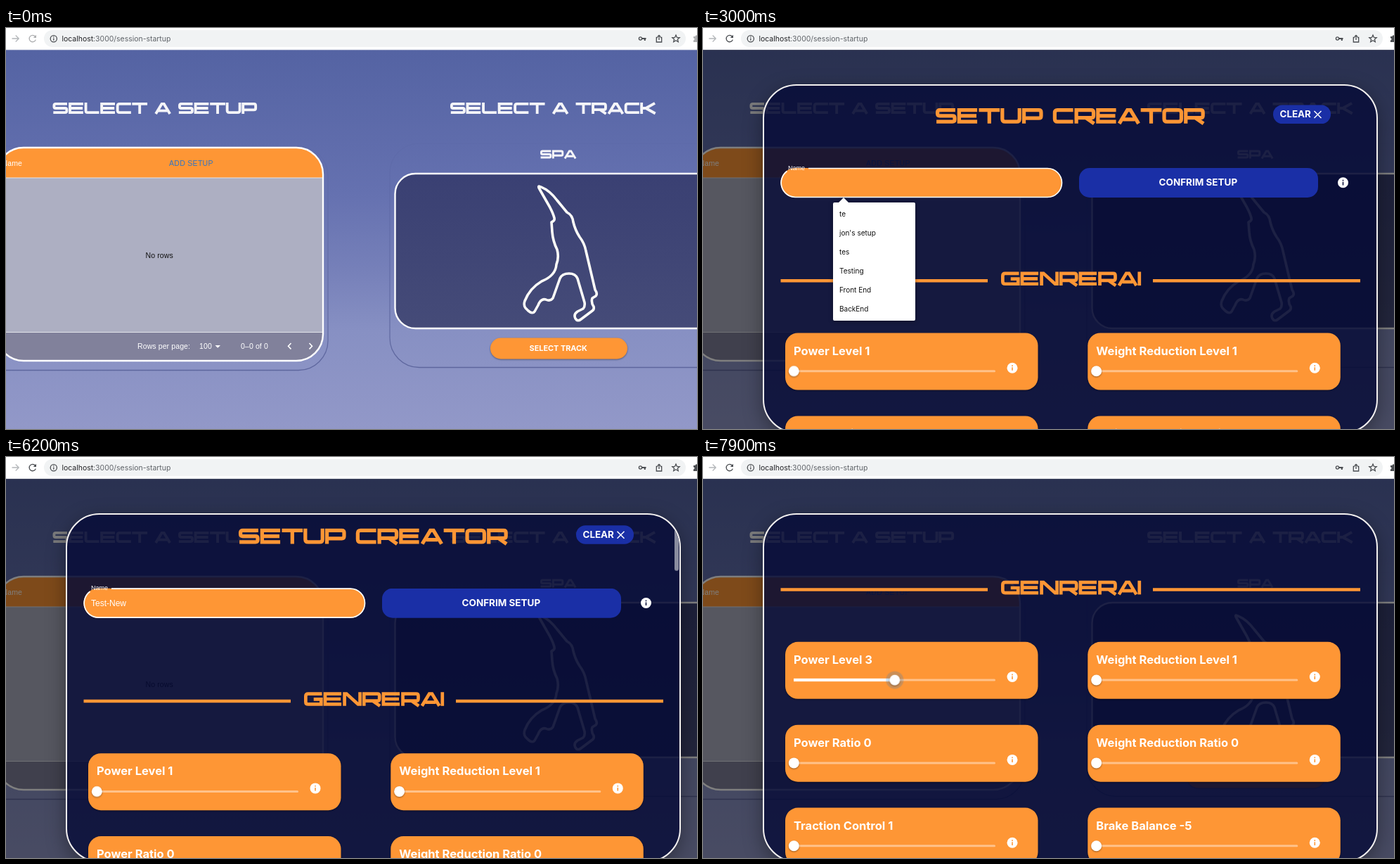
An HTML page for the animation above (8 s loop, 983x570 px).

```html
<!DOCTYPE html>
<html lang="en">
<head>
<meta charset="utf-8">
<title>Session startup</title>
<style>
html, body { margin: 0; width: 100%; height: 100%; overflow: hidden; background: #fff; }
#stage { position: absolute; left: 0; top: 0; width: 983px; height: 570px; overflow: hidden; }
svg { position: absolute; left: 0; top: 0; }
text { font-family: "Liberation Sans", Arial, sans-serif; white-space: pre; }
.ui { font-size: 10.5px; letter-spacing: .11px; fill: #fff; }
.sys { font: 10.45px Inter, sans-serif; }
.bold { font: 700 16.5px Inter, sans-serif; fill: #fff; }
.word path { fill: none; stroke: currentColor; stroke-width: 2.4; }
.line { fill: none; stroke: #4a4d51; stroke-width: 1.3; }
.card { fill: #fe9635; filter: drop-shadow(0 1px 1px #0006); }
.knob { fill: #fff; filter: drop-shadow(0 1px 1px #0006); }

#shade { position: absolute; top: 31px; width: 983px; height: 539px; background: #000; opacity: 0; }
#frame {
  position: absolute; box-sizing: border-box; left: 85px; top: 80px; width: 875px; height: 496px;
  border: 2px solid #f4f1f0; border-radius: 48px; background: rgba(5, 10, 55, .8);
  box-shadow: 0 8px 28px rgba(0, 0, 0, .36);
}

#shade, .wake, #hover, #ripple, #label, #scroll, #bar, #barMove, #thumb, #fill, #halo {
  animation: 8s linear infinite;
}
.wake { animation-name: wake; animation-timing-function: step-end; }
#hover { animation-name: hover; }
#ripple { animation-name: ripple; }
#shade { animation-name: shade; }
#label { animation-name: float; }
#scroll { animation-name: scroll; }
#bar { animation-name: bar; }
#barMove { animation-name: barMove; }
#thumb { animation-name: thumb; }
#fill { animation-name: fill; transform-origin: 129px 0; }
#halo { animation-name: halo; }

@keyframes wake { from { opacity: .45 } 13.75%, to { opacity: 1 } }
@keyframes hover { 0%, 17.2% { opacity: 0 } 19.5%, 25% { opacity: 1 } 27%, to { opacity: 0 } }
@keyframes ripple {
  0%, 20.6% { r: 0; opacity: 1 }
  22.5% { r: 38px; opacity: 1 }
  24% { r: 66px; opacity: 1 }
  26.25%, to { r: 70px; opacity: 0 }
}
@keyframes shade {
  0%, 23.74% { opacity: 0 }
  23.75% { opacity: .26; animation-timing-function: ease-out }
  26%, to { opacity: .5 }
}
@keyframes float {
  0%, 31% { transform: translate(121px, 223.6px); animation-timing-function: ease-out }
  33.5%, to { transform: translate(121px, 201.6px) scale(.75) }
}
@keyframes scroll {
  0%, 77% { transform: none; animation-timing-function: cubic-bezier(.4, .1, .75, .85) }
  80% { transform: translateY(-152px); animation-timing-function: cubic-bezier(.1, .6, .3, 1) }
  83.75%, to { transform: translateY(-170.7px) }
}
@keyframes barMove {
  0%, 77% { transform: none }
  80% { transform: translateY(22px); animation-timing-function: ease-out }
  83.75%, to { transform: translateY(25px) }
}
@keyframes bar { 0%, 77.4% { opacity: 0 } 77.5%, 87.2% { opacity: 1 } 91%, to { opacity: 0 } }
@keyframes thumb {
  0%, 94.8% { transform: none }
  96%, 97% { transform: translateX(72px); animation-timing-function: ease-out }
  98.7%, to { transform: translateX(143.5px) }
}
@keyframes fill {
  0%, 94.8% { transform: scaleX(0) }
  96%, 97% { transform: scaleX(.25); animation-timing-function: ease-out }
  98.7%, to { transform: scaleX(.5) }
}
@keyframes halo {
  0%, 88.5% { r: 0 }
  90.5% { r: 13px }
  92.5%, 95% { r: 17px }
  98%, to { r: 12.5px }
}
</style>
</head>
<body>
<div id="stage">
<svg width="983" height="570">
  <defs>
    <linearGradient id="sky" x2="0" y2="1">
      <stop stop-color="#5463a3"/><stop offset=".38" stop-color="#6571b0"/>
      <stop offset=".58" stop-color="#7680b9"/><stop offset=".74" stop-color="#8790c3"/>
      <stop offset="1" stop-color="#9298c8"/>
    </linearGradient>
    <linearGradient id="rim" x2="0" y2="1">
      <stop stop-color="#46508c" stop-opacity=".06"/><stop offset="1" stop-color="#3f4884" stop-opacity=".6"/>
    </linearGradient>
    <linearGradient id="asphalt" x2="0" y2="1">
      <stop stop-color="#3a4073"/><stop offset="1" stop-color="#454b78"/>
    </linearGradient>
    <clipPath id="table"><rect x="-13" y="170" width="464" height="303" rx="38"/></clipPath>
    <clipPath id="button"><rect x="226" y="178.500" width="75" height="27" rx="3"/></clipPath>
  </defs>

  <rect y="31" width="983" height="539" fill="url(#sky)"/>

  <!-- browser bar -->
  <rect width="983" height="31" fill="#fff"/>
  <rect y="30.500" width="983" height=".8" fill="#dcdfe6"/>
  <rect x="54" y="3" width="913" height="24" rx="12" fill="#f1f3f4"/>
  <path class="line" style="stroke:#b4b7ba" d="M8.500 15H18M13.700 10.500L18.200 15L13.700 19.500"/>
  <g class="wake">
    <path class="line" d="M41.600 12.200A4.700 4.700 0 1 0 42.300 16.600"/>
    <path fill="#4a4d51" d="M43 9.800V14H38.800Z"/>
    <path fill="#4a4d51" d="M978 12h2.500a1.700 1.700 0 0 1 3.400 0v8h-6v-2.600a1.600 1.600 0 0 0 0-3.200Z"/>
  </g>
  <circle class="line" cx="67.800" cy="15.200" r="4.600" stroke-width="1.100"/>
  <path class="line" d="M67.800 14.500V17.800M67.800 12.300V13.500"/>
  <text class="sys" x="79.500" y="19" fill="#5f6368"><tspan fill="#202124">localhost</tspan>:3000/session-startup</text>
  <circle class="line" cx="902.500" cy="15" r="2.100" stroke-width="2"/>
  <path class="line" style="stroke-width:2" d="M905 15H910.500M908.800 15V18"/>
  <path class="line" d="M927 13.500H925.300V20H932.700V13.500H931M929 17V10.500M926.800 12.500L929 10.300L931.200 12.500"/>
  <path class="line" d="M953 10l1.500 3.400 3.700.3-2.800 2.400.9 3.600-3.300-1.900-3.300 1.900.9-3.600-2.800-2.400 3.700-.3Z"/>

  <!-- setup table -->
  <g class="word" data-word="SELECT A SETUP" data-at="66.500 106 1.600" color="#f5f5f8"></g>
  <rect x="-60" y="168" width="518" height="318.500" rx="42" fill="none" stroke="url(#rim)" stroke-width="1.300"/>
  <g clip-path="url(#table)">
    <rect x="-13" y="170" width="466" height="43" fill="#fe9635"/>
    <rect x="-13" y="213" width="466" height="220" fill="#adafc2"/>
    <rect x="-13" y="433" width="466" height="41" fill="#81819b"/>
    <path d="M-13 213H452M-13 432.500H452" stroke="#e2e3ea"/>
    <text class="ui" x="-5.500" y="195.600">Name</text>
    <g id="hover">
      <path d="M219.500 171V212" stroke="#9b6a44"/>
      <path d="M218.500 186.500V197M449.500 186.500V197" stroke="#fff" stroke-width="1.500"/>
      <g fill="#fff"><circle cx="438.500" cy="187.800" r="1.400"/><circle cx="438.500" cy="192" r="1.400"/><circle cx="438.500" cy="196.200" r="1.400"/></g>
      <g clip-path="url(#button)">
        <rect x="226" y="178" width="75" height="28" fill="#1976d2" opacity=".05"/>
        <circle id="ripple" cx="241" cy="192" r="0" fill="#1976d2" fill-opacity=".28"/>
      </g>
    </g>
    <text x="232" y="195.600" font-size="10.500" letter-spacing=".3" fill="#2f74c6">ADD SETUP</text>
    <text class="ui" x="198.500" y="326.500" style="fill:#111">No rows</text>
    <text class="ui" x="187" y="456.300">Rows per page:</text>
    <text class="ui" x="275" y="456.300">100</text>
    <path d="M297.500 451H305L301.200 454.800Z" fill="#fff"/>
    <text class="ui" x="334" y="456.300">0–0 of 0</text>
    <path d="M405.500 448L401.500 452.200L405.500 456.400M431.500 448L435.500 452.200L431.500 456.400" fill="none" stroke="#fff" stroke-width="1.600"/>
  </g>
  <rect x="-13" y="170" width="464" height="303" rx="38" fill="none" stroke="#fff" stroke-width="2.400"/>

  <!-- track -->
  <g class="word" data-word="SELECT A TRACK" data-at="632 106 1.600" color="#f5f5f8"></g>
  <rect x="546" y="164" width="500" height="318.500" rx="42" fill="none" stroke="url(#rim)" stroke-width="1.300"/>
  <g class="word" data-word="SPA" data-at="760 173.500 1.200" color="#f5f5f8"></g>
  <rect x="553.500" y="207" width="480" height="220" rx="29" fill="url(#asphalt)" stroke="#fff" stroke-width="2.400"/>
  <path fill="none" stroke="#fffef8" stroke-width="3.600" stroke-linejoin="round" d="M758 225Q772 229 784 245L798 262Q806 266 807 276Q810 288 816 297Q823 306 825 317L838 372Q842 378 839 381L834 384Q832 390 836 396Q837 400 834 402L818 414Q813 418 810 413Q807 407 813 403L821 399Q824 396 823 390L813 356Q810 349 801 349Q791 349 788 356L778 384Q774 389 768 386Q761 384 757 394L752 403Q749 407 743 402L739 398Q736 394 738 388Q745 370 762 360Q782 352 783 336Q787 326 784 315Q778 303 777 290L776 276Q781 274 780 270Q778 262 771 250L759 229Q757 226 758 225Z"/>
  <rect class="card" x="689" y="440.500" width="195" height="30" rx="15"/>
  <text class="bold" x="744.500" y="459.300" style="font-size:10.9px">SELECT TRACK</text>
</svg>

<div id="shade"></div>

<div data-on="1900">
<div id="frame"></div>
<svg width="983" height="570">
  <defs><clipPath id="inside"><rect x="87" y="82" width="871" height="492" rx="46"/></clipPath></defs>
  <g clip-path="url(#inside)">
    <g id="scroll">
      <g class="word" data-word="SETUP CREATOR" data-at="331 114 2.180" color="#fe9635"></g>
      <rect x="811" y="109.500" width="82" height="26.500" rx="13.200" fill="#1a2fa6"/>
      <text class="bold" x="820.500" y="127.400" style="font-size:13.4px">CLEAR</text>
      <path d="M869.500 118L879.500 128M879.500 118L869.500 128" stroke="#fff" stroke-width="1.500"/>

      <rect x="110.500" y="199" width="400" height="42" rx="20.500" fill="#fe9635"/>
      <rect data-off="2500" x="111" y="199.500" width="399" height="41" rx="20.500" fill="none" stroke="#fff" stroke-width="1.200"/>
      <path data-on="2500" d="M150 199.500H490A20.500 20.500 0 0 1 490 240.500H131.500A20.500 20.500 0 0 1 119.500 203.500" fill="none" stroke="#fff" stroke-width="1.700"/>
      <g id="label"><text font-size="12" fill="#fff">Name</text></g>
      <text id="typed" x="121" y="223.800" font-size="12" fill="#fff"></text>
      <path id="caret" d="M.5 213V228" stroke="#fff"/>

      <rect x="535" y="199" width="340" height="42" rx="15" fill="#1a2fa6"/>
      <text class="bold" x="648.500" y="224.400" style="font-size:13.5px">CONFRIM SETUP</text>
      <g data-info="910.500 219.800 #0d123c"></g>

      <path d="M110.500 359.300H405M640 359.300H935" stroke="#fe9635" stroke-width="4.500"/>
      <g class="word" data-word="GENRERAI" data-at="424 346.500 1.960" color="#fe9635"></g>
      <g id="cards"></g>
    </g>
    <g id="bar"><rect id="barMove" x="951" y="85" width="6" height="73" rx="3" fill="#a0a2b0" opacity=".85"/></g>
  </g>
  <g data-on="2600" data-off="5100">
    <path d="M187 248H193L200 241L207 248H300a2 2 0 0 1 2 2V414a2 2 0 0 1-2 2H187a2 2 0 0 1-2-2V250a2 2 0 0 1 2-2Z" fill="#fff" style="filter:drop-shadow(0 1px 3px #0006)"/>
    <g id="list"></g>
  </g>
</svg>
</div>
</div>

<script>
const LOOP = 8000;
const $ = id => document.getElementById(id);

// Wide display lettering on a grid ten units high
const GLYPHS = {
  S: 'M12.800 1.200H2.600Q1.200 1.200 1.200 2.500V3.700Q1.200 5 2.600 5H11Q12.400 5 12.400 6.300V7.500Q12.400 8.800 11 8.800H.5',
  E: 'M13 1.200H1.200V8.800H13M1.200 5H12.500',
  L: 'M1.200 0V7.300Q1.200 8.800 2.700 8.800H13',
  C: 'M13.200 1.200H3Q1.200 1.200 1.200 3V7Q1.200 8.800 3 8.800H13.200',
  T: 'M0 1.200H13.600M6.800 1.200V10',
  A: 'M1 10L6.300 1.200H8.300L13.600 10M3.500 7.300H11',
  U: 'M1.200 0V7Q1.200 8.800 3 8.800H10.600Q12.400 8.800 12.400 7V0',
  P: 'M1.200 10V1.200H10.900Q12.400 1.200 12.400 2.700V5Q12.400 6.500 10.900 6.500H1.200',
  R: 'M1.200 10V1.200H10.900Q12.400 1.200 12.400 2.700V4.800Q12.400 6.300 10.900 6.300H1.200M7.500 6.300L12.800 10',
  K: 'M1.200 0V10M1.200 5H5L13 .5M5 5L13.400 9.700',
  N: 'M1.200 10V1.200H2.600L11 8.800H12.400V0',
  O: 'M3 1.200H10.600Q12.400 1.200 12.400 3V7Q12.400 8.800 10.600 8.800H3Q1.200 8.800 1.200 7V3Q1.200 1.200 3 1.200Z',
  G: 'M13 1.200H3Q1.200 1.200 1.200 3V7Q1.200 8.800 3 8.800H12.400V5.200H7',
  I: 'M.8 0V10'
};
const advance = c => c === ' ' ? 6 : c === 'A' ? 15 : 14.1;

for (const g of document.querySelectorAll('[data-word]')) {
  const [x, y, k] = g.dataset.at.split(' ');
  let pen = 0;
  g.setAttribute('role', 'img');
  g.setAttribute('aria-label', g.dataset.word);
  g.setAttribute('transform', `translate(${x} ${y}) scale(${k})`);
  g.innerHTML = [...g.dataset.word].map(c => {
    const path = GLYPHS[c] ? `<path transform="translate(${pen})" d="${GLYPHS[c]}"/>` : '';
    pen += advance(c);
    return path;
  }).join('');
}

const info = (x, y, color) =>
  `<circle cx="${x}" cy="${y}" r="7.500" fill="#fff"/>
   <path d="M${x} ${y - 1}v4.600M${x} ${y - 4}v1.700" stroke="${color}" stroke-width="1.600"/>`;
for (const g of document.querySelectorAll('[data-info]')) {
  const [x, y, color] = g.dataset.info.split(' ');
  g.innerHTML = info(+x, +y, color);
}

const settings = ['Power Level 1', 'Weight Reduction Level 1', 'Power Ratio 0',
  'Weight Reduction Ratio 0', 'Traction Control 1', 'Brake Balance -5'];
$('cards').innerHTML = settings.map((name, i) => {
  const live = i === 0;
  return `<g transform="translate(${i % 2 * 430.3} ${433.5 + (i >> 1) * 117.9})">
    <rect class="card" x="117" width="359.500" height="81" rx="18"/>
    <text class="bold" x="129" y="31"${live ? ' id="level"' : ''}>${name}</text>
    <rect x="129" y="52.700" width="287" height="3" rx="1.500" fill="#fff" opacity=".42"/>
    ${live ? '<rect id="fill" x="129" y="52" width="287" height="4.200" fill="#fff"/>' : ''}
    <g${live ? ' id="thumb"' : ''}>
      ${live ? '<circle id="halo" cx="129.300" cy="54.200" r="0" fill="#1976d2" opacity=".22"/>' : ''}
      <circle class="knob" cx="129.300" cy="54.200" r="7.500"/>
    </g>
    ${info(440, 49.7, '#fe9635')}
  </g>`;
}).join('');

// Typing, with the suggestions it narrows down
const keys = [[3300, 'T'], [3500, 'Te'], [3600, 'Tes'], [3700, 'Test'], [5100, 'Test-'],
  [5400, 'Test-N'], [5500, 'Test-Ne'], [5700, 'Test-New']];
const recent = ['te', "jon's setup", 'tes', 'Testing', 'Front End', 'BackEnd',
  'test', 'Test Setup', 'test2', 'test3', 'Tester'];
const matches = value => recent.filter(s => s.toLowerCase().startsWith(value.toLowerCase())).slice(0, 6);

// Visibility, unlike display, leaves running animations alone
const show = (el, on) => { el.style.visibility = on ? '' : 'hidden'; };
const timed = [...document.querySelectorAll('[data-on], [data-off]')];
let shown = null;

function render(t) {
  for (const el of timed) {
    const { on = 0, off = LOOP } = el.dataset;
    show(el, t >= on && t < off);
  }
  const [since, value] = keys.filter(k => k[0] <= t).pop() || [2500, ''];
  if (value !== shown) {
    shown = value;
    $('typed').textContent = value;
    $('list').innerHTML = matches(value).map((s, i) =>
      `<text class="sys" style="font-size:10px" x="194" y="${268 + i * 27}" fill="#111">${s}</text>`).join('');
  }
  const lit = t >= 2500 && Math.floor((t - since) / 500) % 2 === 0;
  show($('caret'), lit);
  if (lit) $('caret').setAttribute('transform', `translate(${121 + (value ? $('typed').getComputedTextLength() : 0)})`);
  $('level').textContent = 'Power Level ' + (t < 7600 ? 1 : t < 7800 ? 2 : 3);
}

let start;
function tick(now) {
  start ??= now;
  render((now - start) % LOOP);
  requestAnimationFrame(tick);
}
render(0);
requestAnimationFrame(tick);
</script>
</body>
</html>
```
